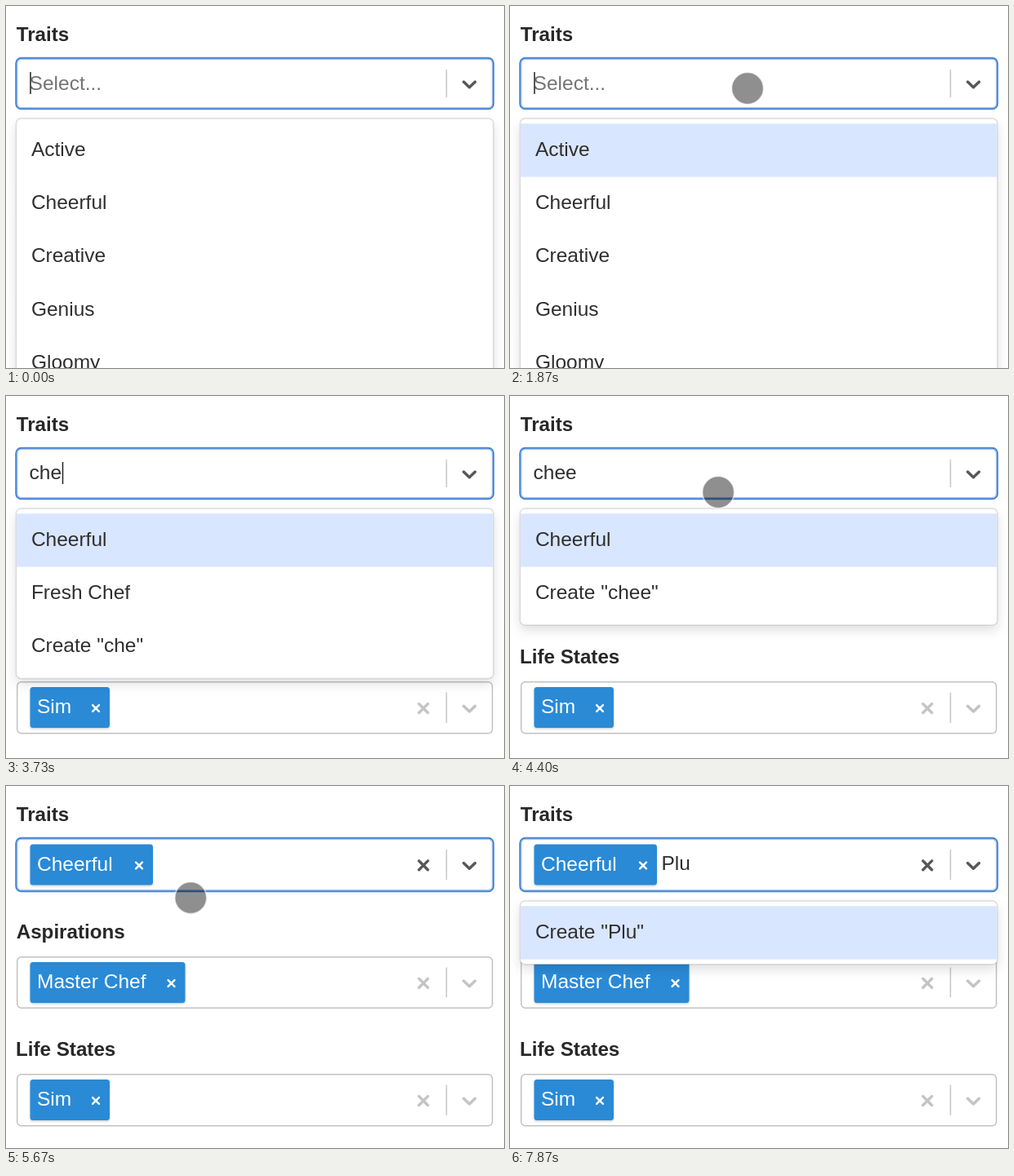
These frames come from a looping animation (610x444 px, 8000 ms). An HTML page:

```html
<!DOCTYPE html>
<html lang="en">
<head>
<meta charset="utf-8">
<title>Multi-select form</title>
<style>
html, body { margin: 0; width: 100%; height: 100%; overflow: hidden; background: #fff; }
svg { display: block; width: 610px; height: 444px; }
text { font: 24.5px "Liberation Sans", Arial, sans-serif; fill: #2f2f2f; white-space: pre; }
.label { font-size: 24.2px; font-weight: bold; fill: #282828; }
.hint { fill: #747474; }
.tag { fill: #fff; }
.icon { fill: none; stroke-linecap: round; stroke-linejoin: round; }
</style>
</head>
<body>
<svg viewBox="0 0 610 444">
  <defs>
    <filter id="drop" filterUnits="userSpaceOnUse" x="-30" y="100" width="670" height="600">
      <feDropShadow dx="0" dy="6" stdDeviation="7" flood-color="#000" flood-opacity=".13"/>
    </filter>
    <filter id="soft" x="-10%" y="-10%" width="120%" height="140%">
      <feDropShadow dx="0" dy="1.5" stdDeviation="1.2" flood-color="#000" flood-opacity=".18"/>
    </filter>
  </defs>
  <g id="form"></g>
  <circle id="dot" r="19.5" fill="#000" fill-opacity=".44" stroke="#fff" stroke-opacity=".6" stroke-width="1.6"/>
</svg>
<script>
const LOOP = 8000;
const form = document.getElementById('form');
const dot = document.getElementById('dot');

const ALL = ['Active', 'Cheerful', 'Creative', 'Genius', 'Gloomy'];

// Each state lasts until the next one starts and restarts the caret blink.
const states = [
  { at: 0, menu: ALL, focused: true, plain: true },
  { at: 130 },
  { at: 1800, menu: ALL, focused: true },
  { at: 3270, typed: 'c', menu: ['Active', 'Cheerful', 'Creative', 'Romantic', 'Perfectionist'], focused: true },
  { at: 3470, typed: 'ch', menu: ['Cheerful', 'Childish', 'Dance Machine', 'Fresh Chef'], create: true, focused: true },
  { at: 3660, typed: 'che', menu: ['Cheerful', 'Fresh Chef'], create: true, focused: true },
  { at: 3800, typed: 'chee', menu: ['Cheerful'], create: true, focused: true },
  { at: 5130, picked: true, focused: true },
  { at: 6670, typed: 'P', menu: ['Perfectionist', 'Playful', 'Plain', 'Simple'], create: true, picked: true, focused: true },
  { at: 6930, typed: 'Pl', menu: ['Playful', 'Plain', 'Simple'], create: true, picked: true, focused: true },
  { at: 7270, typed: 'Plu', menu: [], create: true, picked: true, focused: true }
];

const clamp = v => Math.max(0, Math.min(1, v));
const lerp = (a, b, f) => a + (b - a) * f;
const mix = (a, b, f) => `rgb(${a.map((v, i) => Math.round(lerp(v, b[i], f)))})`;
const out = k => u => 1 - Math.pow(1 - u, k);
const smooth = u => u * u * (3 - 2 * u);

const moves = [
  { show: 1130, hide: 3270, from: 1130, to: 1600, a: [425, -12], b: [291, 101], ease: out(2.1) },
  { show: 4270, hide: 5470, from: 4200, to: 4870, a: [291, 101], b: [125, 180], ease: smooth },
  { show: 5470, hide: 6530, from: 5470, to: 5930, a: [125, 180], b: [262, 122], ease: out(2.34) },
  { show: 6530, hide: 6670, from: 6530, to: 6531, a: [268, 137], b: [268, 137], ease: smooth }
];

const ruler = document.createElement('canvas').getContext('2d');
ruler.font = '24.5px "Liberation Sans", Arial, sans-serif';
const widthOf = s => ruler.measureText(s).width;

const text = (x, y, s, cls = '') => `<text x="${x}" y="${y}" class="${cls}">${s}</text>`;
const cross = (x, y, r, color, w) =>
  `<path class="icon" stroke="${color}" stroke-width="${w}" d="M${x - r} ${y - r}l${2 * r} ${2 * r}m0 ${-2 * r}l${-2 * r} ${2 * r}"/>`;

function tag(y, s, w) {
  return `<rect x="29.5" y="${y}" width="${w}" height="50" rx="3.5" fill="#2b8ad6" filter="url(#soft)"/>` +
    text(38, y + 32, s, 'tag') + cross(29.5 + w - 17, y + 26, 3.9, '#fff', 2.4);
}

function control(top, h, focus, clearable) {
  const mid = top + h / 2;
  const ink = mix([196, 196, 196], [88, 88, 88], focus);
  const edge = mix([194, 194, 194], [176, 196, 222], focus);
  const frame = (grow, rest) => `<rect x="${13.7 - grow}" y="${top + .7 - grow}" rx="${5 + grow}"
    width="${582 + 2 * grow}" height="${h - 1.4 + 2 * grow}" ${rest}/>`;
  return frame(0, `fill="#fff" stroke="${edge}" stroke-width="1.5"`) +
    (focus ? frame(1.5, `fill="none" stroke="#3f84d8" stroke-width="1.9" opacity="${focus}"`) : '') +
    `<path d="M539.5 ${top + 13.5}V${top + h - 13.5}" stroke="#c8c8c8" stroke-width="1.6"/>
    <path class="icon" stroke="${ink}" stroke-width="3.5" d="M560.6 ${mid - 1.9}l7 6.6 7 -6.6"/>` +
    (clearable ? cross(511.3, mid + .8, 5.4, ink, 3.4) : '');
}

function menu(s, top) {
  const items = s.create ? [...s.menu, `Create "${s.typed}"`] : s.menu;
  const rows = items.length > 4 ? 7 : items.length;
  const step = 65.3;
  let svg = `<rect x="12.4" y="${top}" width="584.6" height="${12.5 + step * rows}" rx="6"
    fill="#fff" stroke="#000" stroke-opacity=".13" stroke-width="1.5" filter="url(#drop)"/>`;
  if (!s.plain) svg += `<rect x="13" y="${top + 6.3}" width="583.4" height="${step}" fill="#d9e6ff"/>`;
  items.forEach((item, i) => svg += text(30.9, top + 45.8 + step * i, item));
  return svg;
}

function focusAt(t) {
  return t < 1000 ? 1 - clamp((t - 130) / 100) : clamp((t - 1770) / 100);
}

function draw(s, focus, caret) {
  const shift = s.picked ? 3 : 0;
  const h = 61 + shift;
  const typed = s.typed || '';
  const left = s.picked ? 185.5 : 28.5;
  let svg = text(12.7, 43, 'Traits', 'label') + control(64.5, h, focus, s.picked);
  if (s.picked) svg += tag(71.5, 'Cheerful', 150.5);
  if (typed) svg += text(left, s.picked ? 103.3 : 102.3, typed);
  else if (!s.picked) svg += text(28.6, 103, 'Select...', 'hint');
  if (caret) {
    const x = left + 1.5 + widthOf(typed);
    svg += `<path d="M${x} ${81 + shift / 2}v27" stroke="#222" stroke-width="1.5"/>`;
  }
  svg += text(12.7, 184 + shift, 'Aspirations', 'label') + control(206 + shift, 64, 0, true) +
    tag(213 + shift, 'Master Chef', 190) +
    text(12, 328 + shift, 'Life States', 'label') + control(350 + shift, 64.5, 0, true) +
    tag(357 + shift, 'Sim', 97.5);
  if (s.menu) svg += menu(s, 138 + shift);
  return svg;
}

let last = '';
function render(t) {
  const i = states.findLastIndex(s => s.at <= t);
  const s = states[i];
  const focus = focusAt(t);
  const caret = !!s.focused && (t - s.at) % 1000 < 500;
  const key = [i, focus, caret].join();
  if (key !== last) {
    form.innerHTML = draw(s, focus, caret);
    last = key;
  }
  const m = moves.find(m => t >= m.show && t < m.hide);
  dot.setAttribute('visibility', m ? 'visible' : 'hidden');
  if (m) {
    const f = m.ease(clamp((t - m.from) / (m.to - m.from)));
    dot.setAttribute('cx', lerp(m.a[0], m.b[0], f));
    dot.setAttribute('cy', lerp(m.a[1], m.b[1], f));
  }
}

const start = performance.now();
function tick() {
  render((performance.now() - start) % LOOP);
  requestAnimationFrame(tick);
}
tick();
</script>
</body>
</html>
```
